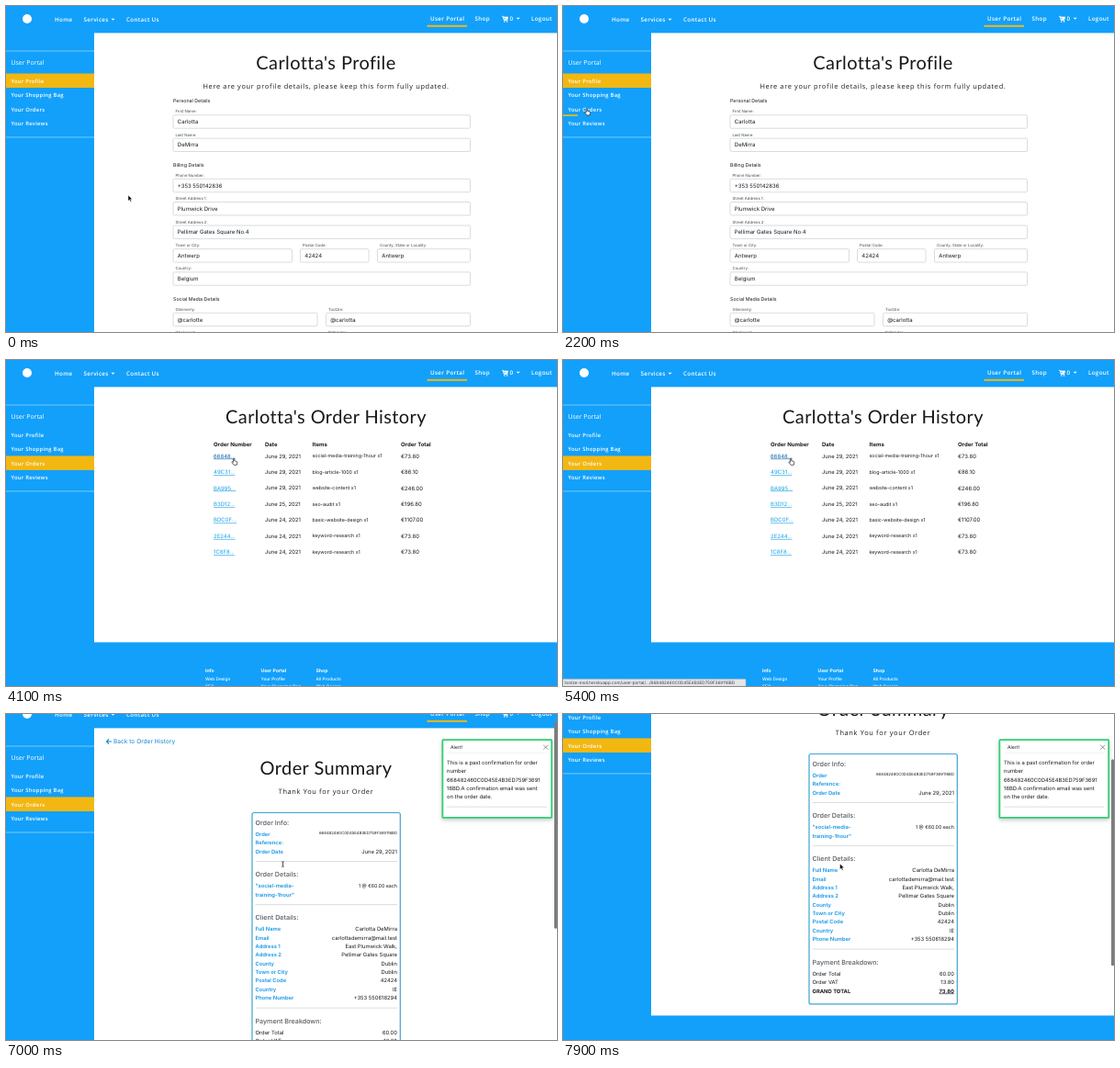
An HTML page that plays this animation: 600x355 px, repeating every 8000 ms.

```html
<!DOCTYPE html>
<html lang="en">
<head>
<meta charset="utf-8">
<title>User portal</title>
<style>
  html, body { margin: 0; width: 100%; height: 100%; overflow: hidden; background: #12a0fa; }
  svg { display: block; width: 600px; height: 355px; }
  text { font-family: Inter, "Liberation Sans", sans-serif; fill: #16191c; white-space: pre;
    text-rendering: geometricPrecision; }
  .nav, .lead, .side, .menu { font-family: "Open Sans", "Noto Sans", sans-serif; }
  .nav { font-size: 6.3px; letter-spacing: .3px; font-weight: 600; fill: #fff; }
  .side { font-size: 6.9px; font-weight: 400; fill: #fff; }
  .menu { font-size: 5.9px; letter-spacing: .24px; font-weight: 600; fill: #fff; }
  .lead { font-size: 7.4px; letter-spacing: .67px; font-weight: 500; text-anchor: middle; }
  .title { font: 20px Lato, "Open Sans", sans-serif; letter-spacing: .4px; text-anchor: middle; }
  .group { font-size: 5.3px; }
  .label { font-size: 4.3px; fill: #44484c; }
  .value { font-size: 6px; }
  .date, .row { font-size: 5.85px; }
  .item { font-size: 5.3px; }
  .th { font-size: 6px; font-weight: 700; }
  .link { font-size: 6px; fill: #12a0e8; text-decoration: underline; }
  .back { font-size: 6.6px; fill: #1489d0; }
  .head { font-size: 7.15px; font-weight: 500; fill: #555b61; }
  .key { font-size: 5.8px; font-weight: 600; fill: #1296e6; }
  .ref { font-size: 4.3px; }
  .bold { font-size: 5.85px; font-weight: 700; }
  .under { text-decoration: underline; }
  .end { text-anchor: end; }
  .foot { font-size: 4.75px; font-weight: 500; fill: #fff; }
  .foothead { font-size: 5.1px; font-weight: 700; fill: #fff; }
  .status { font-size: 4.63px; fill: #3c4043; }
  .alert { font-size: 5.2px; }
  #alert { filter: drop-shadow(0 2px 2px rgba(0, 0, 0, .2)); }
</style>
</head>
<body>
<svg id="stage" viewBox="0 0 600 355" xmlns="http://www.w3.org/2000/svg"></svg>
<script>
const BLUE = '#12a0fa', YELLOW = '#f3b712', LOOP = 8000, STEP = 100;
const REF = '668482460C0D45E4B3ED759F369116BD';
const HOST = 'lionize-ms4.herokuapp.com/user-portal/';

const SIZES = { nav: 6.3, side: 6.9, menu: 5.9, lead: 7.4, title: 20, group: 5.3, label: 4.3,
  value: 6, date: 5.85, row: 5.85, item: 5.3, th: 6, link: 6, back: 6.6, head: 7.15, key: 5.8,
  ref: 4.3, bold: 5.85, foot: 4.75, foothead: 5.1, status: 4.63, alert: 5.2 };

// y is the middle of the capital letters
const text = (cls, x, y, s, attrs = '') =>
  `<text class="${cls}" x="${x}" y="${(y + SIZES[cls.split(' ')[0]] * .36).toFixed(2)}" ${attrs}>${s}</text>`;
const rect = (x, y, w, h, fill, attrs = '') =>
  `<rect x="${x}" y="${y}" width="${w}" height="${h}" fill="${fill}" ${attrs}/>`;
const rule = (x, y, w) => rect(x, y, w, .8, '#d3d5d7');
const paper = h => rect(96, 29.4, 504, h, '#fff');
const caret = (x, y) => `<path d="M${x} ${y}h4l-2 2z" fill="#fff"/>`;
const group = (id, s) => `<g id="${id}">${s}</g>`;

function header() {
  const cart = `<path d="M540 11.2h1.3l1 4.4h4.2M541.7 12h5l-.8 2.6h-3.7z" fill="#fff" stroke="#fff" stroke-width=".7"/>
    <circle cx="542.8" cy="17" r=".8" fill="#fff"/><circle cx="545.6" cy="17" r=".8" fill="#fff"/>`;
  return group('left', text('nav', 53, 14.9, 'Home') + text('nav', 84.5, 14.9, 'Services') +
      caret(114.5, 13.8) + text('nav', 131, 14.9, 'Contact Us')) +
    group('right', text('nav', 462, 13.9, 'User Portal') + text('nav', 510.5, 13.9, 'Shop')) +
    group('icons', '<circle cx="23" cy="14" r="5" fill="#fff"/>' + cart) +
    rect(458.5, 20.8, 43.5, 2, YELLOW, 'id="tab"') +
    text('nav', 548.6, 13.9, '0') + caret(555.7, 12.8) + text('nav', 572, 13.9, 'Logout');
}

function sidebar() {
  const items = ['Your Profile', 'Your Shopping Bag', 'Your Orders', 'Your Reviews'];
  const bar = y => rect(0, y, 96, 1.7, '#4db9fb');
  return bar(48.2) + bar(142) + text('side', 5.5, 62, 'User Portal') +
    rect(0, 73.5, 96, 15.5, YELLOW, 'id="active"') +
    rect(0, 118.3, 0, 1.7, YELLOW, 'id="hover"') +
    items.map((s, i) => text('menu', 5.5, 81.4 + i * 15.6, s)).join('');
}

function profile() {
  const field = (x, y, w, label, value) =>
    text('label', x + 2.5, y - 11.2, label) +
    rect(x, y - 7.2, w, 14.4, '#fff', 'rx="1.4" stroke="#ced4da" stroke-width=".8"') +
    text('value', x + 4.8, y, value);
  const full = 323.5;
  return paper(400) +
    text('title', 348.5, 62.2, "Carlotta's Profile") +
    text('lead', 348.5, 87.7, 'Here are your profile details, please keep this form fully updated.') +
    text('group', 182, 103.3, 'Personal Details') +
    field(182, 126, full, 'First Name:', 'Carlotta') +
    field(182, 151.3, full, 'Last Name:', 'DeMirra') +
    text('group', 182, 173, 'Billing Details') +
    field(182, 195.5, full, 'Phone Number:', '+353 550142836') +
    field(182, 220.7, full, 'Street Address 1:', 'Plumwick Drive') +
    field(182, 246.2, full, 'Street Address 2:', 'Pellimar Gates Square No.4') +
    field(182, 271.8, 129.5, 'Town or City:', 'Antwerp') +
    field(320.5, 271.8, 74.5, 'Postal Code:', '42424') +
    field(404.5, 271.8, 101, 'County, State or Locality:', 'Antwerp') +
    field(182, 297, full, 'Country:', 'Belgium') +
    text('group', 182, 319, 'Social Media Details') +
    field(182, 341.4, 157, 'Glimmerly:', '@carlotte') +
    field(348.5, 341.4, 157, 'Tootzle:', '@carlotta') +
    field(182, 366.6, 157, 'Workmesh:', '') +
    field(348.5, 366.6, 157, 'Palbinder:', '');
}

function history() {
  const rows = [
    ['66848', 29, 'social-media-training-1hour', '73.80'],
    ['49C31', 29, 'blog-article-1000', '86.10'],
    ['BA995', 29, 'website-content', '246.00'],
    ['B3D12', 25, 'seo-audit', '196.80'],
    ['BDC0F', 24, 'basic-website-design', '1107.00'],
    ['2E244', 24, 'keyword-research', '73.80'],
    ['1C8F8', 24, 'keyword-research', '73.80']];
  const cols = [226, 282, 333.5, 430];
  const feet = [
    [217, 'Info', 'Web Design', 'SEO'],
    [277.5, 'User Portal', 'Your Profile', 'Your Shopping Bag'],
    [337.5, 'Shop', 'All Products', 'Web Design']];
  return paper(278) +
    text('title', 348.5, 62.2, "Carlotta's Order History") +
    ['Order Number', 'Date', 'Items', 'Order Total'].map((s, i) => text('th', cols[i], 92.2, s)).join('') +
    rows.map(([id, day, item, total], i) => {
      const y = 104.4 + i * 17.47;
      return text('link', cols[0], y, id + '...', i ? '' : 'id="first"') +
        text('date', cols[1], y, `June ${day}, 2021`) +
        text('item', cols[2], y - .2, item + ' x1') +
        text('value', cols[3], y, '€' + total);
    }).join('') +
    feet.map(([x, a, b, c]) => text('foothead', x, 337.7, a) +
      text('foot', x, 347.6, b) + text('foot', x, 354.8, c)).join('');
}

function summary() {
  const L = 271.5, R = 426;
  const client = [
    ['Full Name', 'Carlotta DeMirra'], ['Email', 'carlottademirra@mail.test'],
    ['Address 1', 'East Plumwick Walk,'], ['Address 2', 'Pellimar Gates Square'],
    ['County', 'Dublin'], ['Town or City', 'Dublin'], ['Postal Code', '42424'],
    ['Country', 'IE'], ['Phone Number', '+353 550618294']];
  const pair = (y, k, v, kc, vc) => text(kc, L, y, k) + text(vc + ' end', R, y, v);
  return paper(377) +
    '<path d="M115 44h-5.4m2.5-2.6L109.5 44l2.6 2.6" fill="none" stroke="#1489d0" stroke-width="1.1"/>' +
    text('back', 117, 44, 'Back to Order History') +
    text('title', 348.5, 72.6, 'Order Summary') +
    text('lead', 348.5, 97.9, 'Thank You for your Order') +
    rect(268, 121.5, 161.3, 272.4, '#fff', 'rx="2" stroke="#3fa3cf" stroke-width="1.2"') +
    text('head', L, 132.4, 'Order Info:') +
    text('key', L, 145, 'Order') + text('key', L, 154.3, 'Reference:') +
    text('ref end', R, 143.2, REF) +
    pair(163.5, 'Order Date', 'June 29, 2021', 'key', 'row') +
    rule(L, 174.2, 154.5) +
    text('head', L, 188.8, 'Order Details:') +
    text('key', L, 201.3, '"social-media-') + text('key', L, 210.6, 'training-1hour"') +
    text('item end', R, 201, '1 @ €60.00 each') +
    rule(L, 221.3, 154.5) +
    text('head', L, 235.8, 'Client Details:') +
    client.map(([k, v], i) => pair(248.3 + i * 9.33, k, v, 'key', 'row')).join('') +
    rule(L, 333.7, 154.5) +
    text('head', L, 348.4, 'Payment Breakdown:') +
    pair(361, 'Order Total', '60.00', 'row', 'row') +
    pair(370.2, 'Order VAT', '13.80', 'row', 'row') +
    pair(379.4, 'GRAND TOTAL', '73.80', 'bold', 'bold under');
}

function alertBox() {
  const lines = ['This is a past confirmation for order', 'number', REF.slice(0, 28),
    REF.slice(28) + '.A confirmation email was sent', 'on the order date.'];
  return rect(475.4, 28.2, 118.8, 84.6, '#fff', 'stroke="#2fd073" stroke-width="1.8" rx=".6"') +
    text('alert', 484, 36.2, 'Alert!') +
    '<path d="M585.2 33.7l5 5m0-5l-5 5" stroke="#666" stroke-width=".7"/>' +
    rect(480, 42, 109, .7, '#eceeef') +
    lines.map((s, i) => text('row', 480, 52.8 + i * 9.35, s)).join('') + rule(480, 100.7, 109);
}

const pointers = {
  arrow: '<path d="M0 0v6.3l1.5-1.3 1 2.3 1.1-.5-1-2.2h2z" fill="#000" stroke="#fff" stroke-width=".5"/>',
  hand: '<path d="M-.6.6q.7-1 1.3 0v2.2l2.4.6q.9.3.7 1.3l-.5 2.6H.2L-2 4.6q-.3-1 .6-.8l.8.6z" fill="#fff" stroke="#222" stroke-width=".7"/>',
  beam: '<path d="M-1.3.6q1.3 0 1.3.8 0-.8 1.3-.8M0 1.4v4M-1.3 6.2q1.3 0 1.3-.8 0 .8 1.3.8" fill="none" stroke="#222" stroke-width=".8"/>'
};

document.getElementById('stage').innerHTML =
  rect(0, 0, 600, 355, BLUE) +
  group('page', group('body', group('profile', profile()) + group('history', history()) +
    group('summary', summary()) + sidebar()) + header()) +
  rect(477, 27, 116, 4, '#fff', 'rx="1.5" id="strip"') +
  group('alert', alertBox()) +
  rect(597, 0, 3, 225, '#7d7d7d', 'rx="1.5" id="thumb"') +
  group('status', rect(-1, 347.4, 124, 9, '#e4e5e7', 'id="statusBox" stroke="#b4b6b9" stroke-width=".6" rx="1"') +
    text('status', 1.5, 351.5, '', 'id="statusText"')) +
  group('cursor', Object.keys(pointers).map(k => group(k, pointers[k])).join(''));

const $ = id => document.getElementById(id);
const show = (id, on) => $(id).setAttribute('display', on ? 'inline' : 'none');
const set = (id, attrs) => { for (const k in attrs) $(id).setAttribute(k, attrs[k]); };
const move = (id, x, y) => set(id, { transform: `translate(${x} ${y})` });
const clamp = v => Math.max(0, Math.min(1, v));
const smooth = k => k * k * (3 - 2 * k);

function track(keys, t, col, ease = k => k) {
  let i = keys.length - 1;
  while (i > 0 && keys[i][0] > t) i--;
  const a = keys[i], b = keys[i + 1];
  return b ? a[col] + (b[col] - a[col]) * ease((t - a[0]) / (b[0] - a[0])) : a[col];
}
const current = (keys, t) => keys.filter(k => k[0] <= t).pop()[1];

const path = [[0, 133, 206], [300, 133, 206], [900, 38, 80], [1800, 36, 82], [2100, 26, 111.5],
  [2400, 25.5, 112], [2800, 24.5, 113], [3200, 24.5, 113], [3900, 248, 107], [5600, 248, 107],
  [5800, 237.5, 103.8], [6300, 237.5, 103.8], [6800, 301.5, 160], [7400, 301.5, 160.5], [7900, 301.5, 163]];
const shapes = [[0, 'arrow'], [800, 'hand'], [3300, 'arrow'], [3900, 'hand'], [6300, 'arrow'], [6800, 'beam'], [7500, 'arrow']];
const pages = [[0, 'profile'], [2800, 'history'], [5900, 'summary']];
const scrolls = [[0, 0], [6800, 0], [7000, 14], [7300, 48], [7600, 70], [7900, 78]];
const tips = [[0, ''], [2400, 'https://' + HOST + 'orders'], [3300, ''], [4700, HOST + '.../' + REF], [6300, '']];

function draw(t) {
  const page = current(pages, t);
  for (const [, name] of pages) show(name, name === page);

  // each new page first paints without icons, then its active colours fade in
  const age = page === 'profile' ? 1e4 : t - pages.find(p => p[1] === page)[0];
  const ready = age >= STEP;
  const fade = clamp((age - 100) / 240 + .13);
  const scroll = track(scrolls, t, 1);
  move('page', 0, -scroll);
  move('body', 0, ready ? 0 : -2);
  move('left', ready ? 0 : -10, ready ? 0 : -1);
  move('right', ready ? 0 : 9, 0);
  show('icons', ready);
  show('tab', ready);
  set('tab', { fill: age < 200 ? '#fff' : YELLOW });
  show('active', ready);
  set('active', { y: page === 'profile' ? 73.5 : 104.4, 'fill-opacity': fade });
  set('hover', { width: page === 'profile' ? 96 * clamp((t - 2100) / 600) : 0 });
  $('first').style.fill = t >= 3900 ? '#0b62a8' : '';

  show('strip', t >= 6000 && t < 6200);
  show('alert', t >= 6100);
  set('alert', { opacity: clamp((t - 6000) / 300) });
  show('thumb', t >= 6800);
  set('thumb', { y: scroll * .63 });

  const tip = current(tips, t);
  show('status', tip !== '');
  $('statusText').textContent = tip;
  set('statusBox', { width: tip.startsWith('https') ? 123.5 : 200 });

  const shape = current(shapes, t);
  for (const k in pointers) show(k, k === shape);
  move('cursor', track(path, t, 1, smooth), track(path, t, 2, smooth));
}

const start = performance.now();
function tick() {
  const t = (performance.now() - start) % LOOP;
  draw(Math.floor(t / STEP) * STEP);
  requestAnimationFrame(tick);
}
tick();
</script>
</body>
</html>
```
